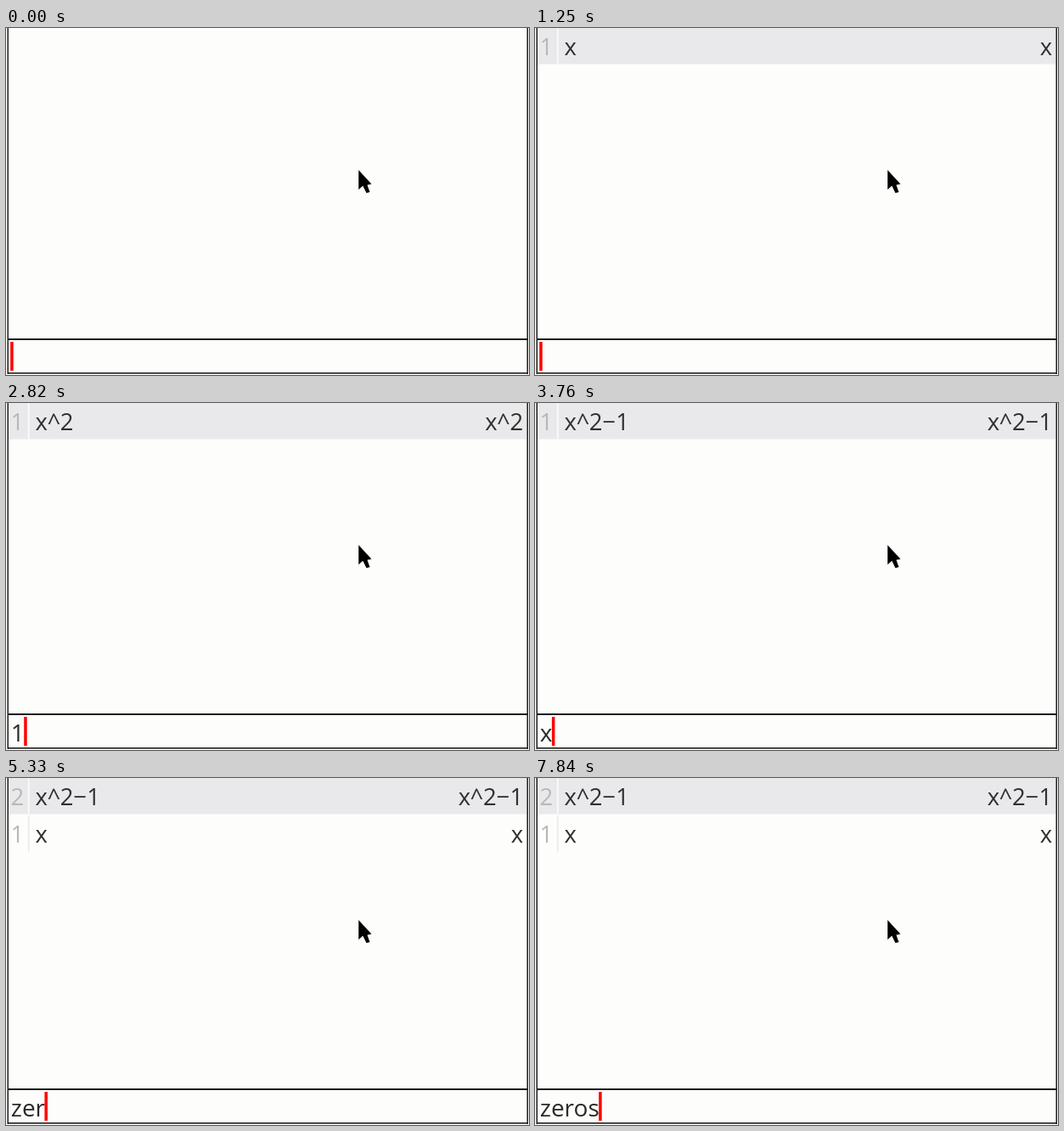
An HTML page that plays this animation: 616x408 px, repeating every 8000 ms.

```html
<!DOCTYPE html>
<html lang="en">
<head>
<meta charset="utf-8">
<title>Stack calculator</title>
<style>
  html, body { margin: 0; width: 100%; height: 100%; overflow: hidden; background: #fdfdfb; }
  svg { display: block; width: 616px; height: 408px; }
  text { font-family: "Open Sans", "Noto Sans", sans-serif; font-size: 27.5px; fill: #303030; white-space: pre; }
  .level { fill: #b8b8bb; }
  .result { text-anchor: end; }
  #entry { font-size: 28px; fill: #2a2a2a; }
  .line { fill: #1c1c1c; }
</style>
</head>
<body>
<svg viewBox="0 0 616 408">
  <rect width="616" height="408" fill="#fdfdfb"/>
  <g id="stack"></g>
  <rect class="line" x="1.5" width="1.5" height="407"/>
  <rect class="line" x="613.5" width="1.5" height="407"/>
  <rect class="line" x="2" y="365" width="612" height="2"/>
  <rect class="line" x="2" y="405" width="612" height="1.6"/>
  <text id="entry" x="5.8" y="397.8"></text>
  <rect id="caret" y="369" width="3.5" height="34" fill="#f00"/>
  <path d="M415.3 167V190L420.3 185.5L424.5 194L428.5 193L425.5 184.5L430.5 183.5Z" fill="#000"/>
</svg>
<script>
  const LOOP = 8000;
  const ROW = 44;

  // start time in ms, stack from top to bottom, entry line
  const steps = [
    [0, [], ""],
    [940, [], "x"],
    [1250, ["x"], ""],
    [1570, ["x"], "2"],
    [2200, ["x^2"], ""],
    [2510, ["x^2"], "1"],
    [3140, ["x^2−1"], ""],
    [3760, ["x^2−1"], "x"],
    [4390, ["x^2−1", "x"], ""],
    [4710, ["x^2−1", "x"], "z"],
    [5330, ["x^2−1", "x"], "zer"],
    [5650, ["x^2−1", "x"], "zeros"]
  ];

  const stackEl = document.getElementById("stack");
  const entryEl = document.getElementById("entry");
  const caretEl = document.getElementById("caret");

  function row(expr, i, all) {
    const top = i * ROW;
    const base = top + 31.5;
    const band = i === 0 ? '<rect x="3" width="610.5" height="42.5" fill="#e9e9eb"/>' : "";
    const rule = i === 0 ? "#fdfdfb" : "#e9e9eb";
    return `${band}
      <rect x="26" y="${top}" width="1.5" height="42.5" fill="${rule}"/>
      <text class="level" x="5.6" y="${base}">${all.length - i}</text>
      <text x="34.5" y="${base}">${expr}</text>
      <text class="result" x="609.2" y="${base}">${expr}</text>`;
  }

  function show([, stack, entry]) {
    stackEl.innerHTML = stack.map(row).join("");
    entryEl.textContent = entry;
    const width = entry ? entryEl.getComputedTextLength() : 0;
    caretEl.setAttribute("x", 5.2 + width);
  }

  let current;
  function tick() {
    const t = performance.now() % LOOP;
    const step = steps.findLast(([start]) => start <= t);
    if (step !== current) show(current = step);
    requestAnimationFrame(tick);
  }
  tick();
</script>
</body>
</html>
```
